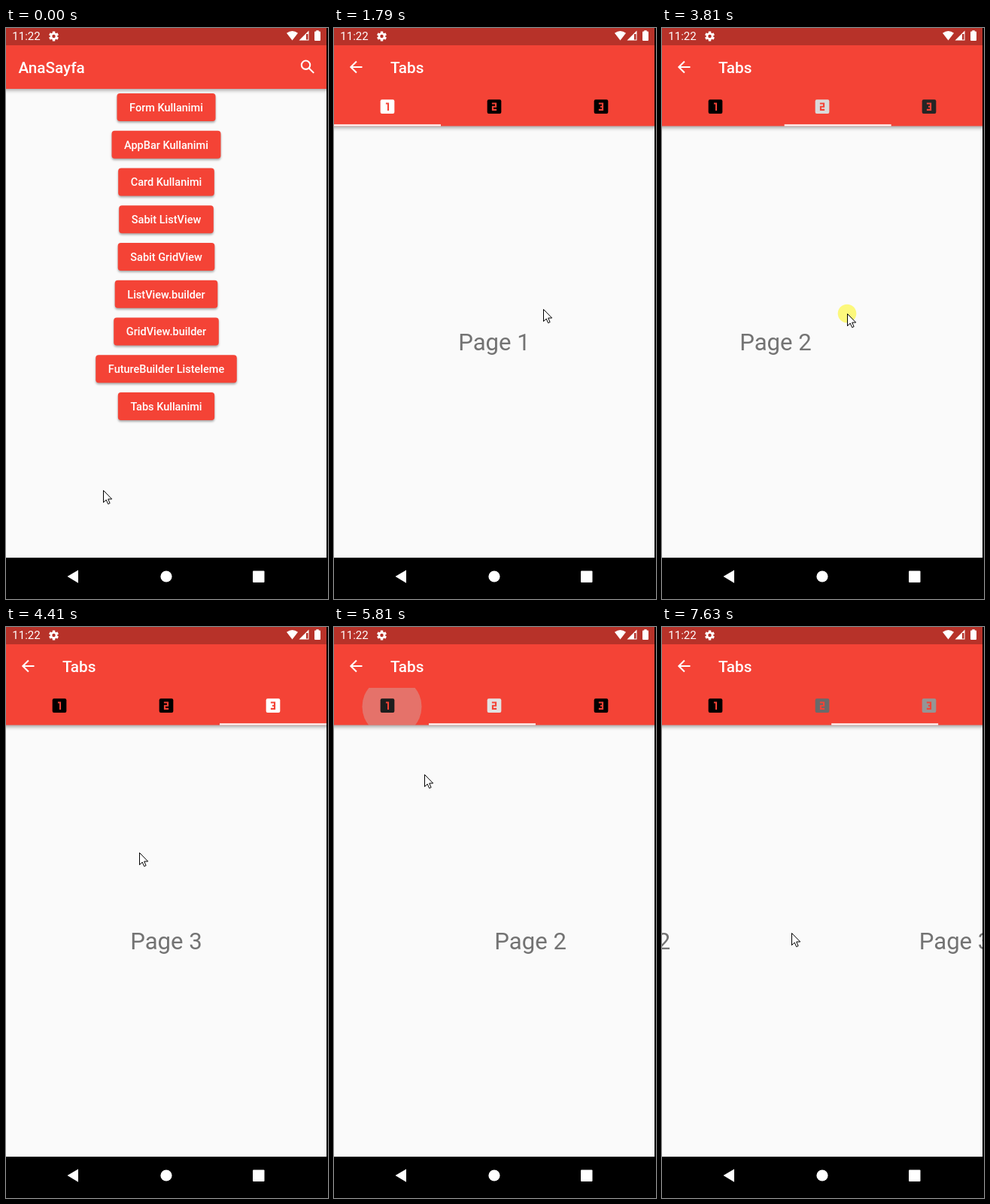
An HTML page with a canvas for the animation above (7830 ms loop, 428x760 px).

```html
<!DOCTYPE html>
<html lang="tr">
<head>
<meta charset="utf-8">
<title>Tabs</title>
<style>
html, body { margin: 0; width: 100%; height: 100%; overflow: hidden; background: #000; }
canvas { display: block; }
</style>
</head>
<body>
<canvas id="stage" width="428" height="760"></canvas>
<script>
const LOOP = 7830, STEP = 200.8;
const W = 426, MID = W / 2, TAB = W / 3, UNIT = 1.0365;
const RED = '#f44336', DARK = '#b73229', PAPER = '#fafafa', WHITE = '#fff';
const stage = document.getElementById('stage').getContext('2d');
const layer = Object.assign(document.createElement('canvas'), { width: 428, height: 760 }).getContext('2d');
let c = stage;

const labels = ['Form Kullanimi', 'AppBar Kullanimi', 'Card Kullanimi', 'Sabit ListView', 'Sabit GridView',
  'ListView.builder', 'GridView.builder', 'FutureBuilder Listeleme', 'Tabs Kullanimi'];

// stroked shapes on a 24 unit grid
const digits = ['M10 8h3v9', 'M9 8h5v4h-4v4h5', 'M9 8h5v8h-5M11 12h3'].map(d => new Path2D(d));
const arrow = new Path2D('M20 12H5.4M12.7 4.7L5.4 12L12.7 19.3');
const lens = new Path2D('M15 9.5a5.5 5.5 0 1 0-11 0a5.5 5.5 0 1 0 11 0M13.8 13.8L19.8 19.8');
const pointer = new Path2D('M.5.5V16.5L4.2 13L6.7 18.6L9.1 17.5L6.7 12H11.7Z');

const OPEN = 1000, SWIPE = 600, SLIDE = 240;
const swipes = [2990, 3661, 6604, 7286];
const taps = [{ t: 5264, tab: 1, x: 208 }, { t: 5763, tab: 0, x: 77 }];

// a swipe drags the cursor down to the left
const stroke = s => [[s, 302, 360], [s + .6 * SWIPE, 162, 411]];
const route = [
  [0, 129, 615], [990, 209, 518], [1190, 209, 518], [1790, 278, 374], [2380, 278, 374],
  ...stroke(swipes[0]), ...stroke(swipes[1]),
  [5010, 201, 126], [5264, 208, 106], [5610, 77, 106], [5810, 119, 195],
  ...stroke(swipes[2]), ...stroke(swipes[3])
];

const clamp = v => Math.max(0, Math.min(1, v));
const smooth = v => (v = clamp(v), v * v * (3 - 2 * v));

function page(t) {
  const forth = swipes.reduce((sum, s) => sum + smooth((t - s) / SWIPE), 0);
  return taps.reduce((sum, tap) => sum - smooth((t - tap.t) / SLIDE), forth);
}

function position(t) {
  const i = route.findIndex(k => k[0] > t);
  if (i < 0) return route.at(-1).slice(1);
  const [t0, x0, y0] = route[i - 1], [t1, x1, y1] = route[i];
  const f = (t - t0) / (t1 - t0);
  return [Math.round(x0 + (x1 - x0) * f), Math.round(y0 + (y1 - y0) * f)];
}

// the picture refreshes about five times a second
const snap = t => Math.max(0, Math.floor((t + 18) / STEP) * STEP - 10);

function rect(x, y, w, h, color) {
  c.fillStyle = color;
  c.fillRect(x, y, w, h);
}

function round(x, y, w, h, r, color) {
  c.fillStyle = color;
  c.beginPath();
  c.roundRect(x, y, w, h, r);
  c.fill();
}

function disc(x, y, r, color) {
  c.fillStyle = color;
  c.beginPath();
  c.arc(x, y, r, 0, Math.PI * 2);
  c.fill();
}

function triangle(x1, y1, x2, y2, x3, y3) {
  c.fillStyle = WHITE;
  c.beginPath();
  c.moveTo(x1, y1);
  c.lineTo(x2, y2);
  c.lineTo(x3, y3);
  c.fill();
}

function text(s, x, y, size, weight, color, align = 'left') {
  c.font = `${weight} ${size}px Roboto, sans-serif`;
  c.textAlign = align;
  c.fillStyle = color;
  c.fillText(s, x, y);
}

// runs a drawing on the 24 unit grid centred at x, y
function icon(x, y, paint) {
  c.save();
  c.translate(x, y);
  c.scale(UNIT, UNIT);
  c.translate(-12, -12);
  c.lineWidth = 2;
  paint();
  c.restore();
}

function line(path, color) {
  c.strokeStyle = color;
  c.stroke(path);
}

function shaded(alpha, blur, paint) {
  c.save();
  c.shadowColor = `rgba(0,0,0,${alpha})`;
  c.shadowBlur = blur;
  c.shadowOffsetY = 2;
  paint();
  c.restore();
}

function header(bottom, title, x) {
  rect(0, 0, W, 760, PAPER);
  shaded(.35, 5, () => rect(-10, 0, W + 20, bottom, RED));
  text(title, x, 60, 20.7, 500, WHITE);
}

function button(label, y, t, pressed) {
  c.font = '500 14.5px Roboto, sans-serif';
  const w = c.measureText(label).width + 32 * UNIT, x = MID - w / 2;
  shaded(.33, 3, () => round(x, y, w, 37, 4, RED));
  if (pressed) {
    c.save();
    round(x, y, w, 37, 4, 'rgba(255,255,255,.08)');
    c.clip();
    disc(210, 518, 22 + (t - 990) * .3, 'rgba(255,255,255,.1)');
    c.restore();
  }
  text(label, MID, y + 23.8, 14.5, 500, WHITE, 'center');
}

function home(t) {
  header(81, 'AnaSayfa', 16.5);
  icon(401.1, 51.8, () => line(lens, WHITE));
  labels.forEach((label, i) => button(label, 87 + i * 48 * UNIT, t, i === 8 && t > 985));
}

function ripple(t, { t: start, tab, x }) {
  const age = t - start;
  if (age < -160 || age > 200) return;
  c.save();
  c.beginPath();
  c.rect(tab * TAB, 81, TAB, 49.5);
  c.clip();
  disc(x, 106, 31 + age * .17, `rgba(200,200,200,${.47 * clamp(1 - age / 200) * clamp(age / 120 + 1.4)})`);
  c.restore();
}

function tabs(t) {
  const p = page(t);
  header(130.5, 'Tabs', 75);
  icon(29.2, 52, () => line(arrow, WHITE));
  taps.forEach(tap => ripple(t, tap));
  digits.forEach((digit, i) => {
    const v = Math.round(255 * clamp(1 - Math.abs(p - i)));
    icon(TAB * (i + .5), 104.7, () => {
      round(3, 3, 18, 18, 2, `rgb(${v},${v},${v})`);
      line(digit, RED);
    });
    text('Page ' + (i + 1), MID + W * (i - p), 429.3, 31.1, 400, '#737373', 'center');
  });
  rect(TAB * p, 128.3, TAB, 2.2, WHITE);
}

function gear(x, y) {
  c.save();
  c.translate(x, y);
  for (let i = 0; i < 6; i++) {
    rect(-1.7, -6.5, 3.4, 4, WHITE);
    c.rotate(Math.PI / 3);
  }
  disc(0, 0, 4.8, WHITE);
  disc(0, 0, 2.2, DARK);
  c.restore();
}

function statusBar() {
  rect(0, 0, W, 23, DARK);
  text('11:22', 8.3, 16, 15, 400, WHITE);
  gear(63.5, 11);
  c.fillStyle = WHITE;
  c.beginPath();
  c.moveTo(380.5, 16.5);
  c.lineTo(373, 6.8);
  c.quadraticCurveTo(380.5, 1.2, 388, 6.8);
  c.fill();
  triangle(389.5, 16.5, 402.5, 16.5, 402.5, 3.5);
  rect(399, 8, 2.5, 7.5, DARK);
  round(410, 4.5, 8, 12.5, 1, WHITE);
  rect(412.3, 3.2, 3.4, 2, WHITE);
}

function navBar() {
  rect(0, 705, 428, 55, '#000');
  rect(W, 0, 2, 760, '#000');
  triangle(81.5, 730, 96, 721.5, 96, 738.7);
  disc(MID, 730, 7.6, WHITE);
  round(328, 722.5, 15.5, 15.5, 1, WHITE);
}

function cursor(t) {
  const [x, y] = position(t);
  if (swipes.some(s => t >= s && t < s + SWIPE / 2)) disc(x, y, 12.3, '#fcf87c');
  c.save();
  c.translate(x, y);
  c.fillStyle = WHITE;
  c.lineWidth = 1;
  c.fill(pointer);
  line(pointer, '#000');
  c.restore();
}

function draw(t) {
  const open = clamp((t - OPEN) / 300);
  if (open < 1) home(t);
  if (open > 0) {
    c = layer;
    tabs(t);
    c = stage;
    c.globalAlpha = open * open;
    c.drawImage(layer.canvas, 0, 170 * (1 - open) ** 3);
    c.globalAlpha = 1;
  }
  statusBar();
  navBar();
  cursor(t);
}

const start = performance.now();
function tick() {
  draw(snap((performance.now() - start) % LOOP));
  requestAnimationFrame(tick);
}
tick();
</script>
</body>
</html>
```
